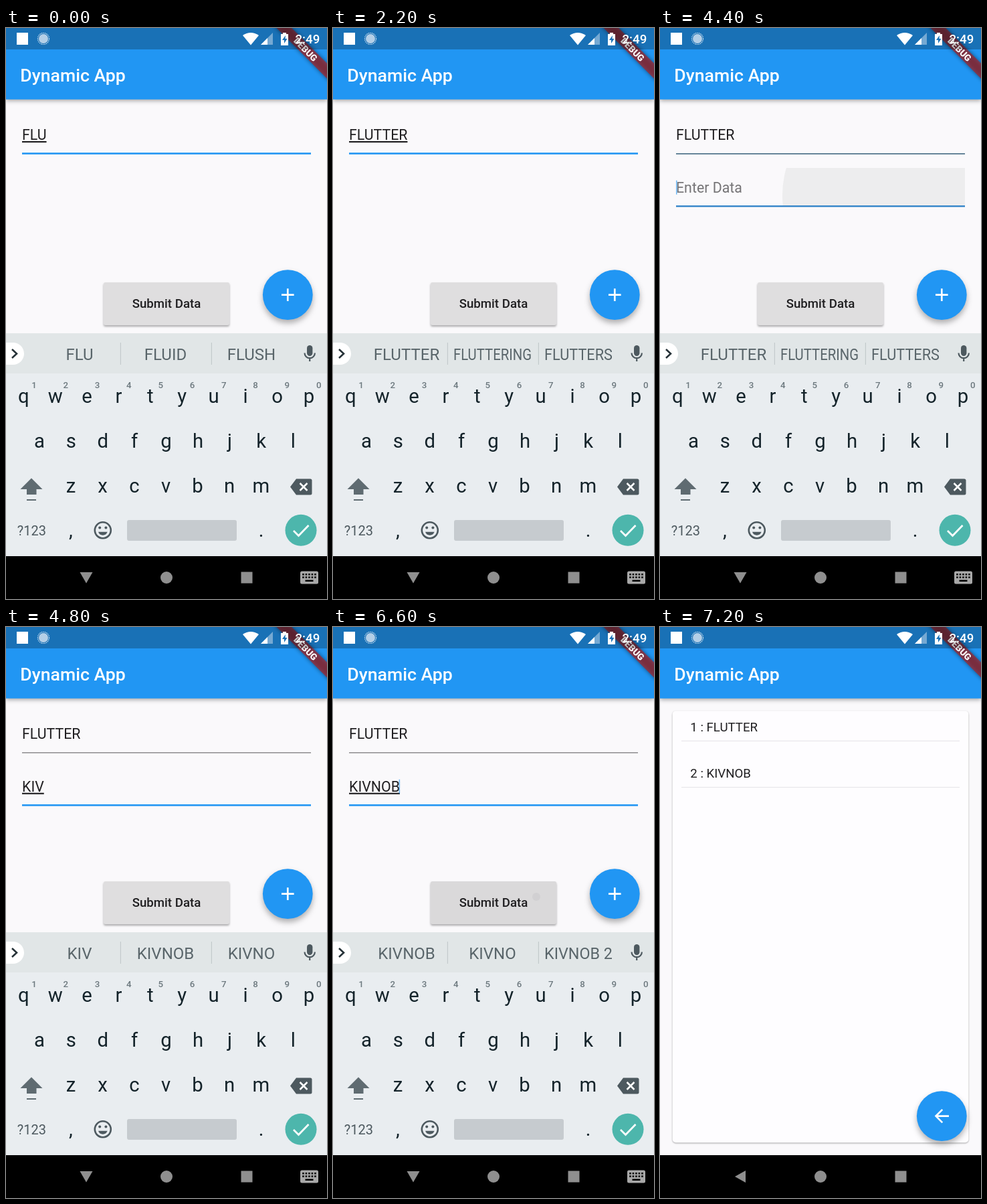
An HTML page that plays this animation: 480 px wide and 853 px high, repeating every 8000 ms.

```html
<!DOCTYPE html>
<html lang="en">
<head>
<meta charset="utf-8">
<title>Dynamic App</title>
<style>
html, body { margin: 0; width: 100%; height: 100%; overflow: hidden; background: #000; }
svg { display: block; width: 100vw; height: 100vh; font-family: Roboto, sans-serif; }
.mid { text-anchor: middle; }
.bar { filter: drop-shadow(0 2px 3px rgba(0,0,0,.35)); }
.fab { filter: drop-shadow(0 5px 4px rgba(0,0,0,.3)); }
.flat { filter: drop-shadow(0 2px 1.5px rgba(0,0,0,.32)); }
.card { filter: drop-shadow(0 1px 1.2px rgba(0,0,0,.35)); }
.blur { filter: blur(3px); }
</style>
</head>
<body>
<svg id="stage" viewBox="0 0 480 853"></svg>
<script>
const STEP = 200, STEPS = 40;
const BLUE = '#2196f3', INK = '#1f1e20', SLATE = '#4d595f';
const stage = document.getElementById('stage');

const rect = (x, y, w, h, fill, more = '') =>
  `<rect x="${x}" y="${y}" width="${w}" height="${h}" fill="${fill}" ${more}/>`;
const circle = (x, y, r, fill, more = '') =>
  `<circle cx="${x}" cy="${y}" r="${r}" fill="${fill}" ${more}/>`;
const path = (d, fill, more = '') => `<path d="${d}" fill="${fill}" ${more}/>`;
const stroke = (d, color, width, more = '') =>
  `<path d="${d}" fill="none" stroke="${color}" stroke-width="${width}" ${more}/>`;
const text = (s, x, y, size, fill, more = '') =>
  `<text x="${x}" y="${y}" font-size="${size}" fill="${fill}" ${more}>${s}</text>`;
const mid = (s, x, y, size, fill, more = '') => text(s, x, y, size, fill, `class="mid" ${more}`);
const within = (i, ...spans) => spans.some(([a, b]) => i >= a && i < b);

// Latest entry of [[step, value], ...] that has begun
const latest = (list, i) => list.filter(e => e[0] <= i).pop()[1];

const FIRST = [[0, 'FLU'], [1, 'FLUT'], [2, 'FLUTTE'], [3, 'FLUTTER']];
const SECOND = [[0, ''], [24, 'KIV'], [25, 'KIVN'], [26, 'KIVNOB']];
const WORDS = [
  [0, ['FLU', 'FLUID', 'FLUSH']],
  [1, ['FLUT', 'FLUTE', 'FLUTTER']],
  [2, ['FLUTTE', 'FLUTTER', 'FLUTED']],
  [3, ['FLUTTER', 'FLUTTERING', 'FLUTTERS']],
  [23, ['', '', '']],
  [24, ['KIV', 'KIVNOB', 'KIVNO']],
  [25, ['KIVN', 'KIVNO', 'KIVNOB']],
  [26, ['KIVNOB', 'KIVNO', 'KIVNOB 2']]
];
const SLOTS = [[110, 102], [238.5, 117], [367, 102]];

function header() {
  return rect(0, 0, 480, 106.7, BLUE, 'class="bar"') +
    text('Dynamic App', 21.3, 79.5, 26.67, '#fff', 'font-weight="500"') +
    `<g transform="translate(480 0) rotate(45)">` +
    rect(-60, 37.3, 120, 16, 'rgba(0,0,0,.5)', 'class="blur"') +
    rect(-60, 37.3, 120, 16, 'rgba(183,28,28,.63)') +
    mid('DEBUG', 0, 50.2, 13.6, '#fff', 'font-weight="900"') + '</g>' +
    rect(0, 0, 480, 32, 'rgba(0,0,0,.25)') +
    rect(16, 7, 17, 18, '#fff') +
    circle(56, 16, 7, '#b4cfe7') +
    circle(56, 16, 8.5, 'none', 'stroke="#c9deef" stroke-width="1.2" stroke-dasharray="1.6 1"') +
    path('M354 11Q366 3 378 11L366 25.5Z', '#fff') +
    path('M399 7V25H381Z', '#fff', 'opacity=".4"') +
    path('M391 15V25H381Z', '#fff') +
    path('M411 9H414V7H419V9H422V26H411Z', '#fff') +
    path('M418 11L413 18H416V23L420.5 16H417.5Z', '#1970b6') +
    text('2:49', 432.5, 23, 18.67, '#fff', 'font-weight="500"');
}

function field(value, y, active, cursorX, line) {
  const shown = value ? text(value, 24, y + 167, 21.33, INK, active ? 'text-decoration="underline"' : '')
    : text('Enter Data', 24, y + 167, 21.33, '#757476');
  return shown +
    (line || (active ? rect(24, y + 186.2, 432, 2.6, BLUE) : rect(24, y + 187.1, 432, 1.4, '#858486'))) +
    (cursorX ? rect(cursorX, y + 149, 1.5, 21, BLUE, 'opacity=".65"') : '');
}

function fab(y, icon, fill = BLUE) {
  return circle(421.3, y, 37.4, fill, 'class="fab"') +
    `<g transform="translate(405.3 ${y - 16}) scale(1.3333)">${path(icon, '#fff')}</g>`;
}
const PLUS = 'M19 13H13V19H11V13H5V11H11V5H13V11H19Z';
const BACK = 'M20 11H7.83L13.42 5.41L12 4L4 12L12 20L13.41 18.59L7.83 13H20Z';

function form(i) {
  const turning = i === 22, second = i >= 22, pressed = i === 33;
  let s = '';
  if (i === 21) s += circle(329, 249.5, 17, '#ededee');
  if (turning) {
    s += '<clipPath id="box"><rect x="24" y="209" width="432" height="57"/></clipPath>' +
      circle(329, 250, 146, '#ededee', 'clip-path="url(#box)"');
  }
  s += field(latest(FIRST, i), 0, !second,
    within(i, [3, 6], [8, 11], [18, 22]) && 110.2,
    turning && rect(24, 187, 432, 1.8, '#56798f'));
  if (i >= 15) {
    s += field(latest(SECOND, i), 78.7, second,
      within(i, [22, 24]) ? 24 : within(i, [29, 31], [33, 34]) && 98.6,
      turning && rect(24, 265.1, 432, 2.3, '#2f82c8'));
  }
  s += rect(146, 380, 188, 64, pressed ? '#dad9da' : '#dfdedf', 'rx="2.7" class="flat"');
  if (pressed) s += circle(304, 403, 6, '#d1d0d2');
  return s + mid('Submit Data', 240, 418.3, 18.67, INK, 'font-weight="500"') +
    fab(398.6, PLUS, within(i, [14, 16]) ? '#3d9ae8' : BLUE);
}

function results(bottom) {
  return rect(18.7, 125.3, 442.6, bottom - 143.8, '#fefdff', 'rx="5" class="card"') +
    ['FLUTTER', 'KIVNOB'].map((name, n) =>
      text(`${n + 1} : ${name}`, 45.3, 156 + n * 69.3, 18.67, INK) +
      rect(32, 169.6 + n * 69.3, 416, 1.2, '#e8e7ea')).join('') +
    fab(bottom - 58.2, BACK);
}

function keyboard(i) {
  const caps = i === 23;
  const row = (keys, x, y) => [...keys].map((k, n) =>
    mid(caps ? k.toUpperCase() : k, x + n * 47.4, y, 29.3, '#14232a')).join('');
  return rect(0, 456, 480, 333, '#e9edf0') + rect(0, 456, 480, 60, '#e1e6e7') +
    path('M0 470H10.5A16.5 16.5 0 0 1 10.5 503H0Z', '#fff') +
    stroke('M9 480L16 486.5L9 493', '#263238', 2.6) +
    rect(170.8, 470, 1.2, 33, '#c3cacc') + rect(306.8, 470, 1.2, 33, '#c3cacc') +
    latest(WORDS, i).map((w, n) =>
      `<text class="mid word" font-size="24" fill="#59656a" data-slot="${n}">${w}</text>`).join('') +
    rect(450, 474, 8.4, 16, SLATE, 'rx="4.2"') +
    stroke('M446.5 485.5A7.7 7.7 0 0 0 461.9 485.5M454.2 493V498', SLATE, 2.2) +
    row('qwertyuiop', 26.3, 559.5) +
    [...'1234567890'].map((d, n) =>
      mid(d, 42 + n * 47.3, 538, 13.3, '#6c787e', 'font-weight="500"')).join('') +
    row('asdfghjkl', 50, 627) + row('zxcvbnm', 97, 694.3) +
    path('M38 672.5L54.5 689H45.5V697H31V689H21.5Z', '#5f6b71') + rect(31, 704, 14, 2, '#5f6b71') +
    path('M434 673.5H455Q457.5 673.5 457.5 676V695Q457.5 697.5 455 697.5H434L425 685.5Z', SLATE) +
    stroke('M439.5 680L450.5 691M450.5 680L439.5 691', '#fff', 2.5) +
    mid('?123', 38.3, 758, 20, SLATE) +
    mid(',', 97, 760, 29.3, '#14232a') + mid('.', 381.5, 760, 29.3, '#14232a') +
    circle(144.8, 750.3, 12, 'none', `stroke="${SLATE}" stroke-width="2.6"`) +
    circle(140.2, 746.6, 2, SLATE) + circle(149.4, 746.6, 2, SLATE) +
    path('M138 752.8H151.6A7.2 7.2 0 0 1 138 752.8Z', SLATE) +
    rect(181, 735, 164, 31, '#c6cbcf', 'rx="3"') +
    circle(441, 750.3, 23.5, '#4db6ac') + stroke('M430 751L437.5 758.5L452.5 743', '#fff', 2.7);
}

function navigation(typing) {
  let s = rect(0, 789, 480, 64, '#000') +
    circle(240, 821, 9, '#8f8f8f') + rect(351.5, 812.5, 17, 17, '#8f8f8f');
  if (!typing) return s + path('M112 821L128 812V830Z', '#8f8f8f');
  s += path('M110.5 813H129.5L120 829.5Z', '#8f8f8f') + rect(440, 811.5, 27, 19, '#a8a8a8', 'rx="2.5"');
  for (let n = 0; n < 10; n++) {
    s += rect(443.2 + n % 5 * 4.5, 815 + Math.floor(n / 5) * 4.4, 2.5, 2.5, '#000');
  }
  return s + rect(447.5, 824.5, 12, 2.5, '#000');
}

// Suggestions too wide for their slot are condensed
function fitWords() {
  for (const el of stage.querySelectorAll('.word')) {
    const [x, room] = SLOTS[el.dataset.slot];
    const k = Math.min(1, room / (el.getComputedTextLength() || 1));
    el.setAttribute('transform', `translate(${x} 496) scale(${k} 1)`);
  }
}

function draw(i) {
  const typing = i < 34;
  let s = rect(0, 0, 480, 853, '#faf9fb') +
    (typing ? form(i) : results(i === 34 ? 456.8 : 788.8)) +
    header() + navigation(typing);
  if (i < 35) s += keyboard(i);
  if (i === 35) s += `<g transform="translate(0 13)" opacity=".55">${keyboard(i)}</g>`;
  stage.innerHTML = s;
  fitWords();
}

let shown = -1;
const start = performance.now();
function tick() {
  const i = Math.floor((performance.now() - start) / STEP) % STEPS;
  if (i !== shown) draw(shown = i);
  requestAnimationFrame(tick);
}
tick();
</script>
</body>
</html>
```
